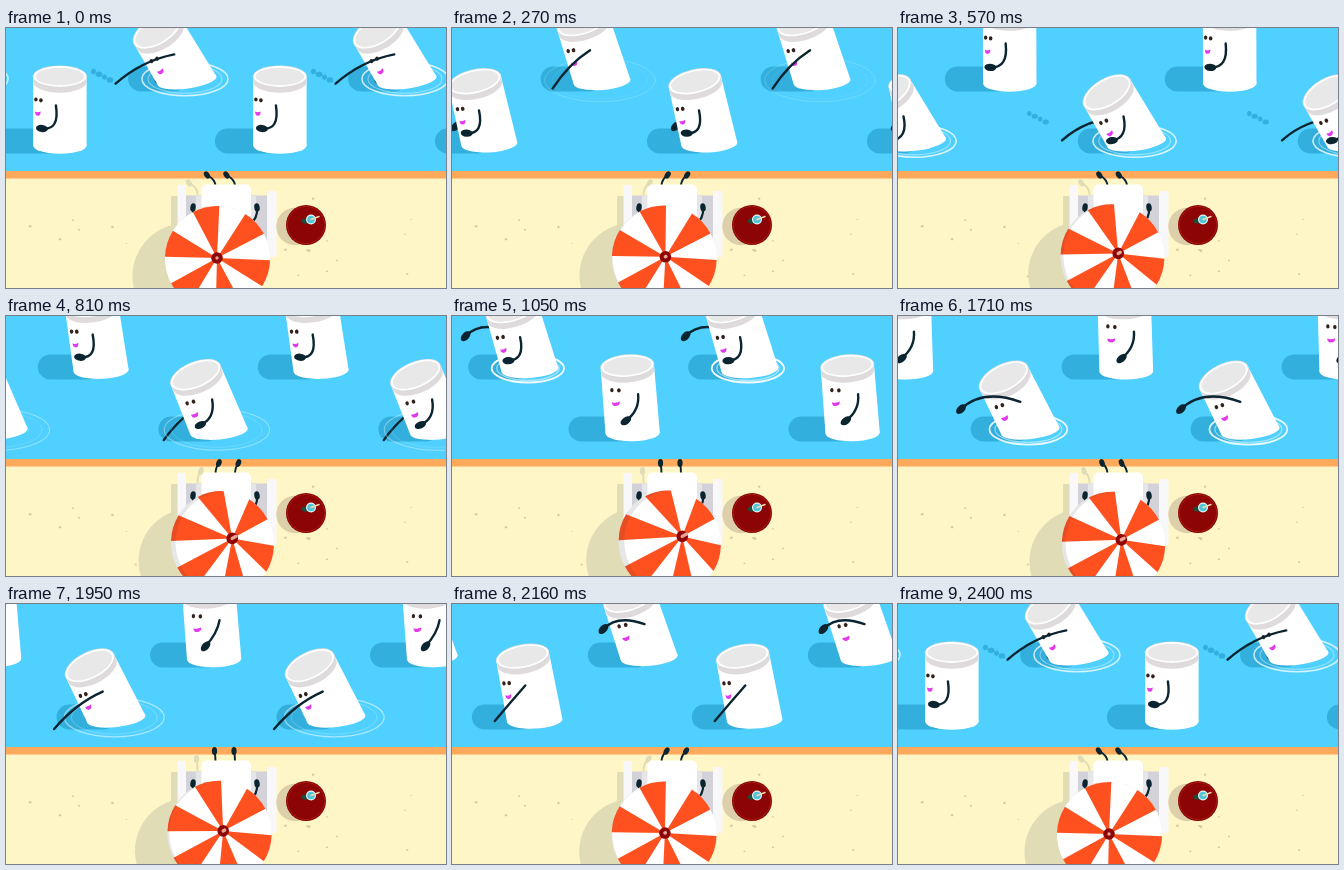
Write an HTML page with a canvas that moves like this. It is 440x260 px and loops after 2.43 s.

```html
<!DOCTYPE html>
<html lang="en">
<head>
<meta charset="utf-8">
<title>Beach day</title>
<style>
html, body { margin: 0; width: 100%; height: 100%; overflow: hidden; background: #50d0ff; }
canvas { display: block; width: 440px; height: 260px; }
</style>
</head>
<body>
<canvas id="stage"></canvas>
<script>
// The motion closes after CYCLE; the last step repeats the first pose.
const LOOP = 2430, STEP = 30, CYCLE = LOOP - STEP, GAP = 220, TAU = Math.PI * 2;
const INK = '#0b2530', SHADE = '#32afdc', SAND_SHADE = '#e0dcb5';
const canvas = document.getElementById('stage');
const ctx = canvas.getContext('2d');
const dpr = window.devicePixelRatio || 1;
canvas.width = 440 * dpr;
canvas.height = 260 * dpr;

// Key poses of one arm stroke, from the shoulder: phase, hand x y, bend x y
const STROKE = [
  [0, -14, 23, 4, 25],      // hanging
  [.55, -13, 27, 0, 14],
  [.6, -22, 19, -12, 9],    // lifting
  [.69, -55, -1, -37, -20], // overhead
  [.755, -58, 31, -32, 8],  // reaching in
  [.87, -36, 38, -20, 14]   // pulling back
];

const mod = (a, n) => ((a % n) + n) % n;

function armPose(phase) {
  const p = mod(phase, 1), n = STROKE.length;
  const i = STROKE.findLastIndex(k => k[0] <= p);
  const keys = [-1, 0, 1, 2].map(d => STROKE[mod(i + d, n)]);
  const end = i + 1 < n ? keys[2][0] : 1;
  const u = (p - keys[1][0]) / (end - keys[1][0]);
  return [1, 2, 3, 4].map(j => {
    const [a, b, c, d] = keys.map(k => k[j]);
    return b + u / 2 * (c - a + u * (2 * a - 5 * b + 4 * c - d + u * (3 * (b - c) + d - a)));
  });
}

function oval(x, y, rx, ry, fill, rot = 0) {
  ctx.beginPath();
  ctx.ellipse(x, y, rx, ry, rot, 0, TAU);
  ctx.fillStyle = fill;
  ctx.fill();
}

function box(x, y, w, h, r, fill) {
  ctx.beginPath();
  ctx.roundRect(x, y, w, h, r);
  ctx.fillStyle = fill;
  ctx.fill();
}

function curve(x, y, bx, by, ex, ey, colour, width) {
  ctx.beginPath();
  ctx.moveTo(x, y);
  ctx.quadraticCurveTo(bx, by, ex, ey);
  ctx.strokeStyle = colour;
  ctx.lineWidth = width;
  ctx.stroke();
}

function arm(x, y, phase) {
  const [hx, hy, bx, by] = armPose(phase), p = mod(phase, 1);
  curve(x, y, x + bx, y + by, x + hx, y + hy, INK, 2.4);
  const wet = p > .735 && p < .95;
  if (!wet) oval(x + hx, y + hy, 6, 3.6, INK, Math.atan2(hy - by, hx - bx));
}

function ripples(x, y, k) {
  if (k < 0 || k > 1) return;
  const r = 34 + 23 * k;
  ctx.strokeStyle = '#fff';
  [1, .86].forEach((s, i) => {
    ctx.globalAlpha = (1 - k) ** .6 * (i ? .55 : 1);
    ctx.lineWidth = (2 - 1.2 * k) * (i ? .7 : 1);
    ctx.beginPath();
    ctx.ellipse(x, y, r * s, r * s * .39, 0, 0, TAU);
    ctx.stroke();
  });
  ctx.globalAlpha = 1;
}

function smile(x, y, w, rot) {
  ctx.save();
  ctx.translate(x, y);
  ctx.rotate(rot);
  ctx.beginPath();
  ctx.ellipse(0, 0, w, 4.2, 0, 0, Math.PI);
  ctx.quadraticCurveTo(0, 1.6, w, 0);
  ctx.fillStyle = '#e03aec';
  ctx.fill();
  ctx.restore();
}

function swimmer(x, base, phase) {
  const beat = phase * 2 % 1, turn = Math.cos(phase * TAU);
  // lean forward once per stroke, with a short hold before the plunge
  const deg = 15.5 * (1 - Math.cos(beat * TAU)) - 10 * Math.exp(-(((beat - .367) / .05) ** 2));
  const a = deg * Math.PI / 180, sin = Math.sin(a), cos = Math.cos(a);
  const h = 69 - deg * .36;
  const bx = x + .4 + deg * .07 + h / 2 * sin, by = base - deg * .1;
  const tx = bx - h * sin, ty = by - h * cos;
  // point on the can: across and down its axis
  const on = (u, v) => [tx + u * cos + v * sin, ty - u * sin + v * cos];

  const left = bx - 65 + deg * .2;
  box(left, base - 17, bx - left, 25, 12.5, SHADE);

  const drop = 1 - Math.abs(beat - .49) / .05;
  if (drop > 0) {
    const far = phase < .5;
    for (let i = 0; i < 4; i++) {
      oval(x + (far ? -90 : -76) + i * 5.5, base + (far ? -32 : -12) + i * 2.8,
        (i % 2 ? 3.7 : 2.7) * Math.sqrt(drop), 3 * Math.sqrt(drop), SHADE);
    }
  }

  arm(...on(0, 29), phase + .5);
  ripples(bx - 2, by - 1.5, (beat - .335) / .42);

  const w = 26.7, bw = w + deg * .1, tip = -a * .25;
  oval(bx, by, bw, 8.2, '#fff', tip);
  ctx.beginPath();
  ctx.moveTo(...on(-w, 0));
  ctx.lineTo(...on(w, 0));
  ctx.lineTo(bx + bw * Math.cos(tip), by + bw * Math.sin(tip));
  ctx.lineTo(bx - bw * Math.cos(tip), by - bw * Math.sin(tip));
  ctx.fill();

  const lid = 10.7 + deg * .1;
  oval(...on(0, 5.5), w, lid, '#dfdbdd', -a);
  oval(tx, ty, w + .4, lid + .4, '#d9d9db', -a);
  oval(tx, ty, w - .3, lid - .3, '#fff', -a);
  oval(tx, ty, w - 2.4, lid - 2, '#e8e8e9', -a);

  const face = -17.5 - 4 * turn, gap = 3 - .5 * turn;
  oval(...on(face - gap, 23), 1.7, 2.1, '#33201c', -a);
  oval(...on(face + gap, 23.8), 1.8, 2.1, '#33201c', -a);
  smile(...on(face - .5, 35), 3.4 - .6 * turn, -a);

  arm(...on(2.5 - 6.5 * turn, 29), phase);
}

function row(phase, x, base) {
  const p = mod(phase, 1), first = mod(x - p * GAP, GAP);
  for (let k = -1; k < 4; k++) swimmer(first + k * GAP, base, p);
}

function specks() {
  let seed = 7;
  const rnd = () => (seed = seed * 16807 % 2147483647) / 2147483647;
  for (let i = 0; i < 26; i++) {
    const r = .7 + rnd() * .8;
    oval(rnd() * 440, 166 + rnd() * 88, r, r * .9, '#d9cb9d');
  }
}

function leg(x, sway, dx, dy, colour) {
  const fx = x + sway + dx, fy = 147 + dy;
  curve(x + 1 + dx, 158 + dy, x + 1 + dx, 151.5 + dy, fx, fy, colour, 1.9);
  oval(fx, fy, 2.6, 4, colour, sway * .08);
}

function lounger(sway) {
  box(178, 167.5, 86, 60, 0, '#d2d2d8');
  box(171.5, 157, 8.5, 73, 1.5, '#f8f8fa');
  box(261, 163, 9.5, 66, 1.5, '#f8f8fa');
  box(190, 168, 60, 60, 0, '#e6e6ea');
  leg(208.5, sway, 0, 0, INK);
  leg(228, sway, 0, 0, INK);
  box(195.5, 156.5, 49.5, 60, [5, 5, 0, 0], '#fff');
  for (const s of [1, -1]) {
    const x = 219 - 32 * s;
    curve(x, 180, x - s, 190, x + 8 * s, 198, INK, 2.2);
    oval(x, 179.5, 2.7, 4.2, INK, s * .15);
  }
}

function table() {
  oval(289, 198.5, 18.7, 18.7, '#dccfaa');
  oval(300, 197, 20, 20, '#8c0404');
  ctx.strokeStyle = '#a01a12';
  ctx.lineWidth = 1;
  ctx.beginPath();
  ctx.arc(300, 197, 18.6, 0, TAU);
  ctx.stroke();
  oval(299.5, 193, 3.8, 2.8, '#23483c');
  oval(305, 191.5, 5, 5, '#e4f7f4');
  oval(305, 191.5, 3.8, 3.8, '#4fc4dd');
  curve(305, 191.5, 309, 190, 313, 188.5, '#f3d9b0', 1.5);
}

function parasol(tilt) {
  const x = 211.5 + 6.5 * tilt, y = 230.5 - 4 * tilt, r = 52.6;
  const hx = 211 + 20 * tilt, hy = 230 - 10 * tilt, axis = -.45;
  // rim arc, foreshortened along the tilt axis
  const rim = (from, to, shift = 0, back = false) => {
    ctx.save();
    ctx.translate(x + shift, y);
    ctx.rotate(axis);
    ctx.scale(1 - .035 * tilt, 1);
    ctx.rotate(-axis);
    ctx.arc(0, 0, r, from, to, back);
    ctx.restore();
  };
  ctx.beginPath();
  rim(0, TAU);
  ctx.fillStyle = '#fff';
  ctx.fill();
  ctx.fillStyle = '#ff5120';
  for (let k = 0; k < 6; k++) {
    const from = (k * 60 - 118) * Math.PI / 180;
    ctx.beginPath();
    ctx.moveTo(hx, hy);
    rim(from, from + TAU / 12);
    ctx.fill();
  }
  // shaded far edge
  ctx.save();
  ctx.beginPath();
  rim(0, TAU);
  ctx.clip();
  ctx.beginPath();
  ctx.rect(100, 150, 200, 150);
  rim(0, TAU, 6 * tilt, true);
  ctx.fillStyle = 'rgba(60, 50, 60, .12)';
  ctx.fill('evenodd');
  ctx.restore();

  oval(hx, hy, 5.8, 5.8, '#8c0606');
  const px = hx + 4.5 * tilt + .01, py = hy - 2.5 * tilt;
  curve(hx, hy, hx, hy, px, py, '#e9a493', 3.4);
}

function beach(phase) {
  const tilt = (1 - Math.cos(phase * TAU)) / 2;
  const sway = -7.5 * Math.cos(phase * 4 * TAU);
  ctx.fillStyle = '#fff6c8';
  ctx.fillRect(0, 150, 440, 110);
  ctx.fillStyle = '#fea95b';
  ctx.fillRect(0, 143, 440, 7.5);
  specks();
  box(165, 168, 12, 62, 1, SAND_SHADE);
  leg(208.5, sway, -18, 8, SAND_SHADE);
  oval(179 + 8 * tilt, 248 - 4 * tilt, 52.5, 52.5, SAND_SHADE);
  lounger(sway);
  table();
  parasol(tilt);
}

function draw(t) {
  const phase = t / CYCLE % 1;
  ctx.setTransform(dpr, 0, 0, dpr, 0, 0);
  ctx.lineCap = 'round';
  ctx.fillStyle = '#50d0ff';
  ctx.fillRect(0, 0, 440, 260);
  row(phase + .75, 273.5 + GAP / 4, 55.5);
  row(phase, 273.5, 117.5);
  beach(phase);
}

const start = performance.now();
function tick() {
  const t = mod(performance.now() - start, LOOP);
  draw(Math.floor(t / STEP) * STEP);
  requestAnimationFrame(tick);
}
tick();
</script>
</body>
</html>
```
